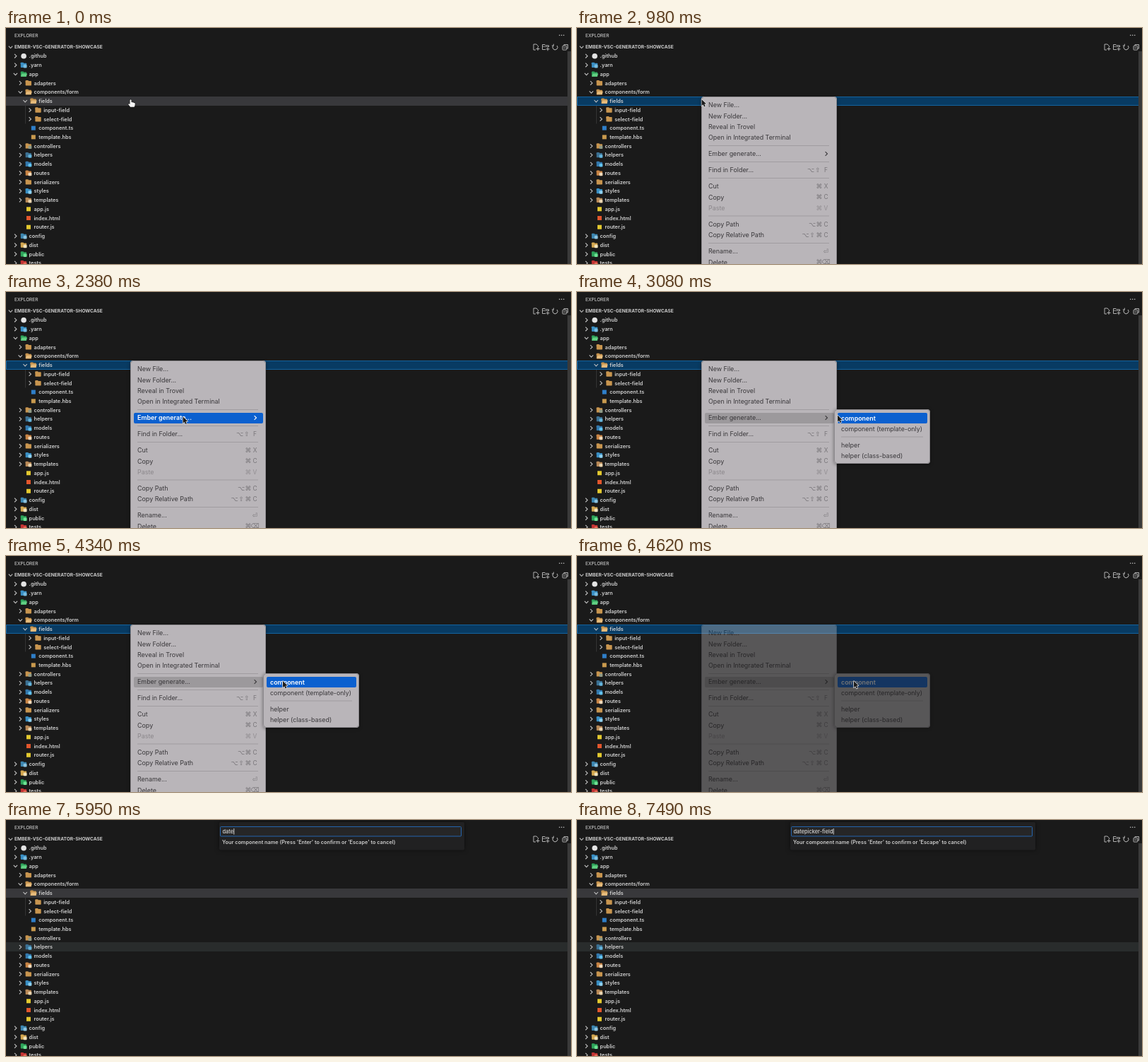
Animation of 800x334 px, one loop 8000 ms. Source, as an HTML page with a canvas:

```html
<!DOCTYPE html>
<html lang="en">
<head>
<meta charset="utf-8">
<title>File explorer</title>
<style>
html, body { margin: 0; width: 100%; height: 100%; overflow: hidden; background: #1a1a1a; }
canvas { display: block; }
</style>
</head>
<body>
<canvas id="stage" width="800" height="334"></canvas>
<script>
const W = 800, H = 334, LOOP = 8000, STEP = 70, LAST = 7490;
const MENU_OPEN = 980, SUB_OPEN = 2450, BLINK = 4410, FADE = 4480, FADE_MS = 230;
const INPUT_OPEN = 4830, TYPE_START = 5250, TYPE_RESUME = 6160;
const NAME = 'datepicker-field';
const SANS = 'Inter, "Open Sans", sans-serif';
const KEYS = '"DejaVu Sans", sans-serif';
const ROW = 12.74, TOP = 39.7, INDENT = 6.85;
const TAN = '#c8954f', BLUE = '#3a8fc4', GREEN = '#2ea35a';

const screen = document.getElementById('stage').getContext('2d');
const layer = document.createElement('canvas');
layer.width = W;
layer.height = H;
const menuCtx = layer.getContext('2d');
let g = screen;

// name, depth, icon kind, colour, badge colour
const tree = [
  ['.github', 0, 'dot', '#e4e4e4'],
  ['.yarn', 0, 'folder', BLUE, '#78bde0'],
  ['app', 0, 'open', GREEN, '#62cf83'],
  ['adapters', 1, 'folder', TAN],
  ['components/form', 1, 'open', TAN],
  ['fields', 2, 'open', TAN],
  ['input-field', 3, 'folder', TAN],
  ['select-field', 3, 'folder', TAN],
  ['component.ts', 2, 'square', '#2f7fc9'],
  ['template.hbs', 2, 'square', '#c99a4e'],
  ['controllers', 1, 'folder', TAN, '#8f9a86'],
  ['helpers', 1, 'folder', '#3c7193', '#65b4da'],
  ['models', 1, 'folder', '#3479ad', '#62c2ee'],
  ['routes', 1, 'folder', '#c98545', '#f0d9ba'],
  ['serializers', 1, 'folder', TAN],
  ['styles', 1, 'folder', BLUE, '#8ed0ee'],
  ['templates', 1, 'folder', '#b98a58', '#ead5b0'],
  ['app.js', 1, 'square', '#e3c92f'],
  ['index.html', 1, 'square', '#e3562c'],
  ['router.js', 1, 'square', '#e3c92f'],
  ['config', 0, 'folder', '#3d86b0', '#8cc3df'],
  ['dist', 0, 'folder', '#d3a750', '#f1e3bd'],
  ['public', 0, 'folder', GREEN, '#6ee394'],
  ['tests', 0, 'folder', '#c33434', '#e66a55']
];
const closed = new Set(['folder', 'dot']);

const items = [
  ['New File...', 109], ['New Folder...', 124.5], ['Reveal in Trovel', 140],
  ['Open in Integrated Terminal', 155], ['Ember generate...', 178],
  ['Find in Folder...', 201, '⌥⇧ F'], ['Cut', 224, '⌘X'], ['Copy', 239.3, '⌘C'],
  ['Paste', 254.6, '⌘V'], ['Copy Path', 277.5, '⌥⌘C'],
  ['Copy Relative Path', 293, '⌥⇧⌘C'], ['Rename...', 316, '⏎'], ['Delete', 331.3, '⌘⌫']
];
const subItems = [
  ['component', 178.3], ['component (template-only)', 193.5],
  ['helper', 216.3], ['helper (class-based)', 231.6]
];

// time, x, y of the pointer tip
const path = [
  [1260, 176.5, 101], [1540, 190, 115], [1750, 213, 134], [2170, 236, 176],
  [2660, 270, 177], [3080, 369, 174.5], [3640, 392, 177]
];

function pointer(t) {
  if (t <= path[0][0]) return path[0].slice(1);
  for (let i = 1; i < path.length; i++) {
    const [t0, x0, y0] = path[i - 1], [t1, x1, y1] = path[i];
    if (t <= t1) {
      const k = (t - t0) / (t1 - t0);
      return [x0 + (x1 - x0) * k, y0 + (y1 - y0) * k];
    }
  }
  return path[path.length - 1].slice(1);
}

function text(s, x, y, size, color, weight = 400, family = SANS, align = 'left') {
  g.font = `${weight} ${size}px ${family}`;
  g.textAlign = align;
  g.textBaseline = 'alphabetic';
  g.fillStyle = color;
  g.fillText(s, x, y + size * 0.36);
}

function box(x, y, w, h, color, r = 0) {
  g.fillStyle = color;
  g.beginPath();
  g.roundRect(x, y, w, h, r);
  g.fill();
}

function frame(x, y, w, h, color, r = 0, width = 1) {
  g.strokeStyle = color;
  g.lineWidth = width;
  g.beginPath();
  g.roundRect(x, y, w, h, r);
  g.stroke();
}

function line(points, color, width = 1) {
  g.strokeStyle = color;
  g.lineWidth = width;
  g.beginPath();
  points.forEach(([x, y]) => g.lineTo(x, y));
  g.stroke();
}

function disc(x, y, r, color) {
  g.fillStyle = color;
  g.beginPath();
  g.arc(x, y, r, 0, Math.PI * 2);
  g.fill();
}

function chevron(x, y, down, color = '#c2c2c2') {
  line(down ? [[x - 2.7, y - 1.4], [x, y + 1.5], [x + 2.7, y - 1.4]]
            : [[x - 1.4, y - 2.8], [x + 1.5, y], [x - 1.4, y + 2.8]], color, 1.1);
}

function icon(kind, x, y, color, badge) {
  if (kind === 'dot') return disc(x, y, 3.8, color);
  if (kind === 'square') return box(x - 3, y - 3, 6, 6, color);
  box(x - 4.3, y - 3.8, 4.2, 3, color, 0.7);
  box(x - 4.3, y - 2.8, 8.3, 6.3, color, 0.7);
  if (kind === 'open') {
    g.fillStyle = badge || '#e5bb7c';
    g.beginPath();
    g.moveTo(x - 2.6, y - 0.8);
    g.lineTo(x + 4.9, y - 0.8);
    g.lineTo(x + 3.6, y + 3.5);
    g.lineTo(x - 4.2, y + 3.5);
    g.fill();
  } else if (badge) {
    box(x - 0.4, y - 0.6, 4.8, 4.6, badge, 1);
  }
}

function actions() {
  const c = '#c0c0c0';
  // new file
  line([[750, 31], [747, 31], [747, 23], [751, 23], [753.5, 25.5], [753.5, 27]], c, 0.9);
  line([[750.5, 29.5], [755.5, 29.5]], c, 0.9);
  line([[753, 27], [753, 32]], c, 0.9);
  // new folder
  line([[764, 30.5], [759.5, 30.5], [759.5, 23.5], [763, 23.5], [764.2, 24.8],
        [768.5, 24.8], [768.5, 27]], c, 0.9);
  line([[759.5, 26.3], [768, 26.3]], c, 0.7);
  line([[764.5, 29.8], [769.5, 29.8]], c, 0.9);
  line([[767, 27.3], [767, 32.3]], c, 0.9);
  // refresh
  g.lineWidth = 1;
  g.beginPath();
  g.arc(777.5, 27.3, 3.5, -0.7, Math.PI * 1.25);
  g.stroke();
  line([[775.3, 22.6], [775.3, 25], [772.8, 25]], c, 0.9);
  // collapse all
  line([[790, 25], [790, 23.5], [795.5, 23.5], [795.5, 29], [794, 29]], c, 0.9);
  frame(788, 25.3, 5.7, 5.7, c, 0.6, 0.9);
  line([[789.3, 28.1], [792.4, 28.1]], c, 0.9);
}

function rowBand(i, color) {
  const y = Math.round(TOP + (i - 0.5) * ROW);
  box(0, y, W, 13, color);
  return y;
}

function explorer(t) {
  box(0, 0, W, H, '#1a1a1a');
  if (t >= MENU_OPEN && t < INPUT_OPEN) {
    const y = rowBand(5, '#083b63');
    frame(0.5, y + 0.5, W - 1, 12, '#14639f');
  } else {
    rowBand(5, '#38383b');
  }
  if (t >= FADE + FADE_MS) rowBand(11, '#292c2c');
  line([[27.5, 110], [27.5, 135.5]], '#3c3c3c', 0.8);
  box(795, 33, 5, H - 33, '#3a3a3a');

  text('EXPLORER', 12, 10.5, 6.5, '#c4c4c4', 500);
  [783.7, 786.7, 789.7].forEach(x => disc(x, 10.3, 0.8, '#c0c0c0'));
  chevron(6.5, 27, true);
  text('EMBER-VSC-GENERATOR-SHOWCASE', 12, 27, 6.6, '#cccccc', 700);
  actions();

  tree.forEach(([name, depth, kind, color, badge], i) => {
    const x = depth * INDENT, y = TOP + i * ROW;
    if (kind !== 'square') chevron(13.4 + x, y, !closed.has(kind));
    icon(kind, 25.1 + x, y, color, badge);
    text(name, 32.6 + x, y, 7.3, '#d0d0d0', 600);
  });
}

function panel(x, y, w, h) {
  g.save();
  g.shadowColor = 'rgba(0,0,0,.45)';
  g.shadowBlur = 5;
  g.shadowOffsetY = 1;
  box(x, y, w, h, '#b9b5b9', 4);
  g.restore();
  frame(x + 0.5, y + 0.5, w - 1, h - 1, 'rgba(100,98,102,.5)', 4);
}

function entry(label, x, y, w, state) {
  const on = state === 'active';
  if (state) box(x - 5, Math.round(y - 7.5), w, 15, on ? '#0b60cf' : '#9c999c', 2);
  const color = on ? '#ffffff' : label === 'Paste' ? '#8b878b' : '#3a383b';
  text(label, x, y, 8.92, color, on ? 600 : 400);
}

function shortcut(keys, y, color) {
  let x = 352.5;
  for (const key of [...keys].reverse()) {
    if (key === ' ') { x -= 2; continue; }
    const letter = /[A-Z]/.test(key);
    text(key, x, y, letter ? 8.4 : 8.8, color, 400, letter ? SANS : KEYS, 'center');
    x -= 9.6;
  }
}

function menu(t) {
  g = menuCtx;
  g.clearRect(0, 0, W, H);
  const [mx, my] = pointer(t);
  const lagY = pointer(t - STEP)[1];
  const sub = t >= SUB_OPEN, inSub = sub && mx >= 365;

  panel(176, 97, 192, H - 97 + 20);
  [166.5, 189.5, 212.5, 266, 304.5].forEach(y => box(186, y - 0.4, 171, 0.8, '#a09ca0'));
  items.forEach(([label, y, keys]) => {
    const hit = t > path[0][0] && Math.abs(lagY - y) < 7.7;
    const state = inSub ? (y === 178 ? 'parent' : '') : hit ? 'active' : '';
    entry(label, 186, y, 183 - 5 + 5, state);
    if (y === 178) chevron(353, y, false, state === 'active' ? '#fff' : '#3a383b');
    if (keys) shortcut(keys, y, label === 'Paste' ? '#928e92' : '#777478');
  });

  if (sub) {
    panel(364, 166, 136, 77);
    box(374, 204.6, 116, 0.8, '#a09ca0');
    const blink = t >= BLINK && t < FADE;
    subItems.forEach(([label, y]) => {
      const hit = inSub && !blink && Math.abs(my - y) < 7.5;
      entry(label, 374, y, 127, hit ? 'active' : '');
    });
  }
  g = screen;
}

function cursor(x, y, shape, edge, fill) {
  g.save();
  g.translate(x, y);
  g.lineJoin = 'round';
  const p = new Path2D(shape);
  g.strokeStyle = edge;
  g.lineWidth = 1.4;
  g.stroke(p);
  g.fillStyle = fill;
  g.fill(p);
  g.restore();
}

function arrow(x, y) {
  cursor(x, y, 'M0 0V9.2L2.1 7.2L3.6 10.5L5.2 9.8L3.8 6.6H6.6Z', '#e4e4e4', '#1c1c1c');
}

function hand(x, y) {
  cursor(x, y, 'M-1 1Q0-.6 1 1V4.2Q2 3.4 2.8 4.5Q4 3.8 4.6 5Q6.2 4.6 6.3 6.2' +
    'Q6.3 9 5 10.8H-.4Q-1.6 8.8-3.3 7.2Q-3.2 5.5-1 6.7Z', '#202020', '#f6f6f6');
}

function typed(t) {
  if (t < TYPE_START) return 0;
  if (t < TYPE_RESUME) return Math.min(4, 1 + Math.floor((t - TYPE_START) / 170));
  return Math.min(NAME.length, 5 + Math.floor((t - TYPE_RESUME) / 110));
}

function prompt(t) {
  g.save();
  g.shadowColor = 'rgba(0,0,0,.5)';
  g.shadowBlur = 6;
  box(302, 3, 347, 39.5, '#212122', 2);
  g.restore();
  box(303.5, 9, 341, 14, '#262627');
  frame(303.5, 9.5, 341, 13.5, '#2465ad', 1);
  const value = NAME.slice(0, typed(t));
  text(value, 306.5, 16, 7.4, '#d6d6d6', 500);
  box(306.8 + g.measureText(value).width, 12, 0.9, 8.5, '#e0e0e0');
  text("Your component name (Press 'Enter' to confirm or 'Escape' to cancel)",
    306, 31, 7.3, '#cccccc', 600);
}

function draw(t) {
  explorer(t);
  const alpha = Math.min(1, Math.max(0, 1 - (t - FADE) / FADE_MS));
  const menuShown = t >= MENU_OPEN && alpha > 0;
  if (menuShown) {
    menu(t);
    g.globalAlpha = alpha;
    g.drawImage(layer, 0, 0);
    g.globalAlpha = 1;
  }
  if (t >= INPUT_OPEN) prompt(t);
  // typing hides the pointer
  if (t < TYPE_START) (menuShown ? arrow : hand)(...pointer(t));
}

function tick() {
  const t = performance.now() % LOOP;
  draw(Math.min(LAST, Math.floor(t / STEP) * STEP));
  requestAnimationFrame(tick);
}
tick();
</script>
</body>
</html>
```
